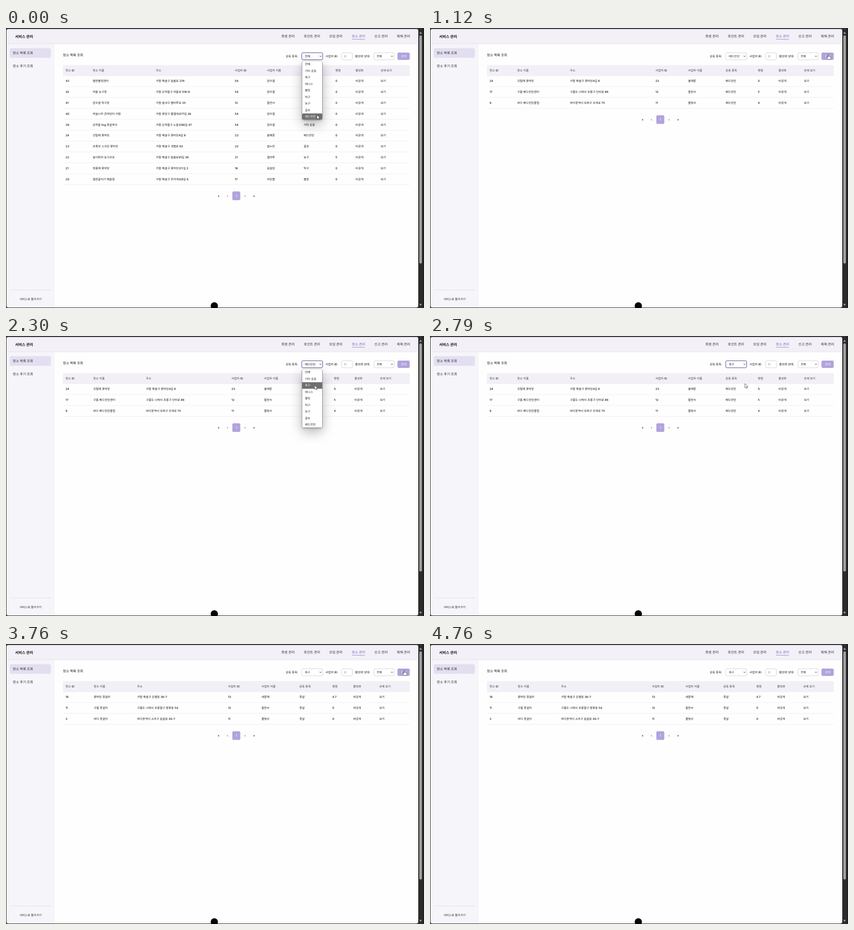
An HTML page that plays this animation: 800x535 px, repeating every 4.79 s.

```html
<!DOCTYPE html>
<html lang="ko">
<head>
<meta charset="utf-8">
<title>서비스 관리</title>
<style>
html, body { margin: 0; width: 100%; height: 100%; overflow: hidden; background: #2c2b2e; }
svg { position: absolute; left: 0; top: 0; width: 800px; height: 535px; }
text {
  font: 500 5.5px Inter, "Noto Sans CJK KR", "Noto Sans CJK", sans-serif;
  fill: #151518; text-rendering: geometricPrecision; white-space: pre;
}
.mid { text-anchor: middle; }
.nav, .side { font-size: 6.4px; font-weight: 400; fill: #2b2930; }
.brand { font-size: 7.1px; font-weight: 700; }
.title { font-size: 6.4px; }
.head { fill: #38363e; }
.option { font-weight: 400; fill: #222; }
.hint { font-weight: 400; fill: #9a98a2; }
.white { fill: #fff; }
.field { fill: #fff; stroke: #cfccd8; stroke-width: .8; }
.accent { fill: #b1a3dc; }

.table, .choice, .focus, .menu, .list, .hot, .arrow, .hand { animation: 4.79s step-end infinite; }
.all { animation-name: all; }
.badminton { animation-name: badminton; }
.futsal { animation-name: futsal; }
.pick0 { animation-name: pick0; }
.pick8 { animation-name: pick8; }
.pick2 { animation-name: pick2; }
.focus { animation-name: focus; }
.menu { animation-name: menu; }
.list { animation-name: list; }
.hot0 { animation-name: hot0; }
.hot1 { animation-name: hot1; }
.hot2 { animation-name: hot2; }
.hot8 { animation-name: hot8; }
.arrow { animation-name: arrow; }
.hand { animation-name: hand; }
.pointer { animation: travel 4.79s ease-in-out infinite; }
.menu {
  position: absolute; left: 566px; top: 62.5px; width: 40px; height: 113px;
  box-sizing: border-box; border: 1px solid #77767b; border-radius: 3.5px;
  box-shadow: 0 8px 22px rgba(0, 0, 0, .27), 0 2px 5px rgba(0, 0, 0, .1);
}

@keyframes all { 0% { opacity: 1 } 23.28%, to { opacity: 0 } }
@keyframes badminton { 0% { opacity: 0 } 23.28% { opacity: 1 } 75.16%, to { opacity: 0 } }
@keyframes futsal { 0% { opacity: 0 } 75.16%, to { opacity: 1 } }
@keyframes pick0 { 0% { opacity: 1 } 1.88%, to { opacity: 0 } }
@keyframes pick8 { 0% { opacity: 0 } 1.88% { opacity: 1 } 53.86%, to { opacity: 0 } }
@keyframes pick2 { 0% { opacity: 0 } 53.86%, to { opacity: 1 } }
@keyframes focus { 0% { opacity: 1 } 18.79% { opacity: 0 } 34.76% { opacity: 1 } 71.4%, to { opacity: 0 } }
@keyframes menu { 0% { opacity: 1 } 1.88% { opacity: 0 } 34.76% { opacity: 1 } 53.86%, to { opacity: 0 } }
@keyframes list { 0% { opacity: 1 } 1.88% { opacity: 0 } 35.38% { opacity: 1 } 53.86%, to { opacity: 0 } }
@keyframes hot8 { 0% { opacity: 1 } 1.88% { opacity: 0 } 35.38% { opacity: 1 } 41.96%, to { opacity: 0 } }
@keyframes hot0 { 0% { opacity: 0 } 41.96% { opacity: 1 } 43.2%, to { opacity: 0 } }
@keyframes hot1 { 0% { opacity: 0 } 43.2% { opacity: 1 } 44.9%, to { opacity: 0 } }
@keyframes hot2 { 0% { opacity: 0 } 44.9% { opacity: 1 } 53.86%, to { opacity: 0 } }
@keyframes arrow {
  0% { opacity: 1 } 12.2% { opacity: 0 } 26% { opacity: 1 }
  66.6% { opacity: 0 } 82.2% { opacity: 1 } 86%, to { opacity: 0 }
}
@keyframes hand {
  0% { opacity: 0 } 12.2% { opacity: 1 } 26% { opacity: 0 }
  66.6% { opacity: 1 } 82.2%, to { opacity: 0 }
}
@keyframes travel {
  0%, 1.88% { transform: translate(595px, 166px); animation-timing-function: ease-in }
  8.14% { transform: translate(720.5px, 84.5px); animation-timing-function: ease-out }
  13.5%, 24.5% { transform: translate(762.5px, 50px) }
  33.4%, 38.6% { transform: translate(594px, 48px) }
  47%, 56% { transform: translate(590.5px, 94px) }
  68.2%, 80.4% { transform: translate(762.5px, 50px); animation-timing-function: ease-in }
  86%, to { transform: translate(806px, 58px) }
}
</style>
</head>
<body>
<svg id="page" viewBox="0 0 800 535">
  <rect width="800" height="535" fill="#38373b"/>
  <rect x="1" y="2" width="788" height="532" rx="4" fill="#fefefe"/>
  <path d="M1 30H93V534H5Q1 534 1 530Z" fill="#f6f5fa"/>
  <path d="M1 30V6Q1 2 5 2H785Q789 2 789 6V30Z" fill="#f3f0f7"/>
  <path d="M1 30.2H789" stroke="#e3e0e9" stroke-width=".8"/>
  <rect x="7" y="38.5" width="79" height="18.5" rx="3" fill="#e3dff0"/>
  <path d="M8 500.5H86" stroke="#e2e0e8" stroke-width=".8"/>
  <path d="M662 21.5H687" stroke="#9583cc" stroke-width=".8"/>
  <rect x="789" y="1" width="9" height="533" fill="#2b2b2c"/>
  <rect x="798" width="2" height="535" fill="#202023"/>
  <rect x="791" y="14" width="5" height="436" rx="2.5" fill="#a0a0a0"/>
  <path d="M791 11L793.5 7L796 11ZM791 527L793.5 531L796 527Z" fill="#a0a0a0"/>
  <circle cx="398.7" cy="531" r="7" fill="#050505"/>
  <rect x="109" y="71" width="664" height="21" fill="#f2f0f6"/>
  <rect class="field" x="566" y="47.3" width="40" height="13.4" rx="2.2"/>
  <rect class="focus" x="566" y="47.3" width="40" height="13.4" rx="2.2" fill="none" stroke="#6860a4"/>
  <rect class="field" x="642.5" y="47.3" width="20.5" height="13.4" rx="2.2"/>
  <rect class="field" x="704.3" y="47.3" width="38.7" height="13.4" rx="2.2"/>
  <rect class="accent" x="749.2" y="47" width="23.5" height="14" rx="2.4"/>
  <path d="M600.2 53.1l1.7 1.7l1.7-1.7M737 53.1l1.7 1.7l1.7-1.7" fill="none" stroke="#222" stroke-width=".9"/>
</svg>
<div class="menu"></div>
<svg viewBox="0 0 800 535">
  <g id="list" class="list">
    <rect x="566.7" y="63.2" width="38.6" height="111.6" rx="2.8" fill="#fff"/>
  </g>
  <g class="pointer" stroke="#29292b" stroke-width=".65" stroke-linejoin="round" fill="#fff">
    <path class="arrow" d="M0 0V8.2L1.9 6.4L3.2 9.3L4.6 8.7L3.3 5.9H6Z"/>
    <path class="hand" d="M-.8 .6Q0-.5 .8 .6V4L2 3.8L2.3 4.4L3.4 4.2L3.7 4.9Q5 4.6 4.9 6L4.4 8.5L3.7 10.2H-.5L-2.9 6.8Q-3-.1-1.6 5.6L-.8 6.3Z"/>
  </g>
</svg>
<script>
const page = document.getElementById('page');
const list = document.getElementById('list');

function add(parent, tag, attrs, content = '') {
  const node = document.createElementNS('http://www.w3.org/2000/svg', tag);
  for (const key in attrs) node.setAttribute(key, attrs[key]);
  node.textContent = content;
  return parent.appendChild(node);
}
const write = (parent, x, y, content, style = '') =>
  add(parent, 'text', { x, y, class: style }, content);

write(page, 17.5, 18.6, '서비스 관리', 'brand');
['회원', '포인트', '모임', '장소', '신고', '제재'].forEach((name, i) => {
  const label = write(page, [527, 570, 618.5, 662, 705, 748][i], 18.2, name + ' 관리', 'nav');
  if (name === '장소') label.style.fill = '#7660b4';
});
write(page, 13, 49.7, '장소 목록 조회', 'side');
write(page, 13, 74.7, '장소 후기 조회', 'side');
write(page, 26, 519.6, '서비스로 돌아가기', 'option');
write(page, 109, 53.9, '장소 목록 조회', 'title');
write(page, 535.5, 56, '운동 종목:');
write(page, 611.5, 56, '사업자 ID:');
write(page, 668.3, 56, '활성화 상태:');
write(page, 646.5, 56, 'ID', 'hint');
write(page, 709.5, 56, '전체', 'option');
write(page, 761, 56, '검색', 'mid white');

const sports = ['전체', '기타 운동', '축구', '테니스', '볼링', '탁구', '농구', '골프', '배드민턴'];
for (const i of [0, 8, 2]) write(page, 572, 56, sports[i], `option choice pick${i}`);

sports.forEach((sport, i) => {
  const y = 69.3 + i * 12.5;
  write(list, 572.3, y + 2, sport, 'option');
  if (![0, 1, 2, 8].includes(i)) return;
  const hot = add(list, 'g', { class: `hot hot${i}` });
  add(hot, 'rect', { x: 566.7, y: y - 6, width: 38.6, height: i === 8 ? 11.5 : 12.5,
    rx: i === 8 ? 2 : 0, fill: '#6f6f70' });
  write(hot, 572.3, y + 2, sport, 'option white');
});

const headings = ['장소 ID', '장소 이름', '주소', '사업자 ID', '사업자 이름', '운동 종목', '평점', '활성화', '상세 보기'];

function drawTable(name, columns, rows) {
  const table = add(page, 'g', { class: `table ${name}` });
  headings.forEach((heading, i) => write(table, columns[i], 83, heading, 'head'));
  rows.forEach((row, r) => {
    const y = 101.4 + r * 20.8;
    [...row.split('|'), '비공개', '보기'].forEach((cell, i) => write(table, columns[i], y + 2, cell));
    add(table, 'path', { d: `M109 ${y + 10.6}H773`, stroke: '#ebe9f0', 'stroke-width': .7 });
  });
  const y = 112.5 + rows.length * 20.8;
  add(table, 'rect', { x: 433.2, y: y - 8.2, width: 15.2, height: 16.6, rx: 2.6, class: 'accent' });
  [...'«‹1›»'].forEach((mark, i) =>
    write(table, 407 + i * 16.9, y + 2.1, mark, mark === '1' ? 'mid white' : 'mid'));
}

drawTable('all', [114, 166, 287, 438, 499.5, 569.7, 630.5, 669, 717], [
  '43|별찬볼링센터|가람 해솔구 늘봄로 274|54|담우결|테니스|0',
  '42|여울 농구장|가람 은하들구 여울로 518-6|54|담우결|탁구|0',
  '41|담우결 탁구장|가람 솔내구 별마루로 35|12|들찬사|볼링|0',
  '40|하늘나무 큰마당터 가람|가람 꽃담구 물결대로71길 28|54|담우결|기타 운동|0',
  '39|은하들 fog 풋살파크|가람 은하들구 노을로86길 47|54|담우결|기타 운동|0',
  '24|깃털채 꽃마당|가람 해솔구 꽃마당4길 8|23|봄해룬|배드민턴|0',
  '23|초록샷 스크린 꽃마당|가람 해솔구 샛별로 63|22|솔누빈|골프|0',
  '22|높이뛰자 농구코트|가람 해솔구 늘봄로91길 36|21|결마루|농구|5',
  '21|핑퐁채 꽃마당|가람 해솔구 꽃마당3가길 2|18|윤슬담|탁구|0',
  '20|열핀굴리기 해솔점|가람 해솔구 무지개로8길 4|17|라온별|볼링|0'
]);
drawTable('badminton', [114, 167, 268, 431.5, 494, 565.7, 627.5, 667, 715.7], [
  '24|깃털채 꽃마당|가람 해솔구 꽃마당4길 8|23|봄해룬|배드민턴|0',
  '17|구름 배드민턴센터|구름도 나래시 초롱구 단비로 86|12|들찬사|배드민턴|5',
  '9|바다 배드민턴클럽|바다광역시 모래구 조개로 75|11|물빛사|배드민턴|4'
]);
drawTable('futsal', [114, 168, 251, 425, 489, 561.5, 624.5, 664.5, 714.5], [
  '18|꽃마당 풋살터|가람 해솔구 은별동 36-7|13|새론해|풋살|4.7',
  '11|구름 풋살터|구름도 나래시 초롱들구 참꽃동 54|12|들찬사|풋살|0',
  '3|바다 풋살터|바다광역시 소라구 윤슬동 36-7|11|물빛사|풋살|0'
]);
</script>
</body>
</html>
```
